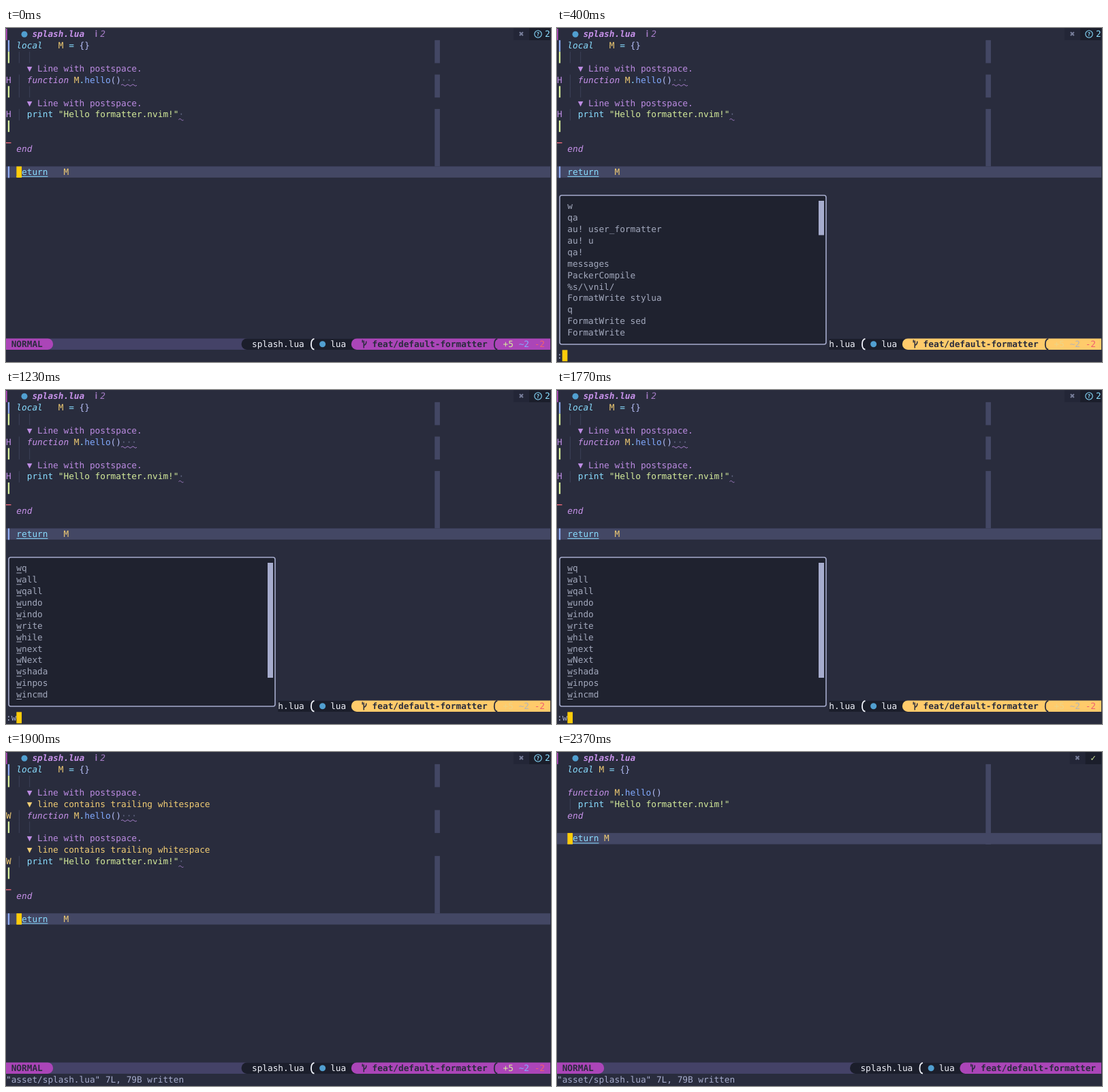
Write an HTML page with a canvas that moves like this. It is 800 px wide and 491 px high and loops after 2.5 s.

```html
<!DOCTYPE html>
<html>
<head>
<meta charset="utf-8">
<style>
html, body { margin: 0; width: 100%; height: 100%; overflow: hidden; background: #292c3d; }
canvas { display: block; }
</style>
</head>
<body>
<canvas id="stage" width="800" height="491"></canvas>
<script>
const g = document.getElementById('stage').getContext('2d');
const LOOP = 2500, W = 7.68, H = 16.87;
const AT = { command: 30, popup: 100, typed: 1070, matches: 1100, written: 1830, back: 1900, formatted: 2070, line: 2130, clean: 2170 };
const BG = '#292c3d', DARK = '#1b1e2b', LINE = '#434764', GREY = '#a6accd', CYAN = '#89ddff', BLUE = '#82aaff',
  PURPLE = '#c792ea', YELLOW = '#f2cd74', GREEN = '#d5ec9b', RED = '#ec6a78', LILAC = '#b4bdf5', CURSOR = '#ffcc0a',
  HINT = '#bd8ce3', WHITE = '#f0f2fa', ICON = '#519fd0';

const HISTORY = ['w', 'qa', 'au! user_formatter', 'au! u', 'qa!', 'messages', 'PackerCompile', '%s/\\vnil/',
  'FormatWrite stylua', 'q', 'FormatWrite sed', 'FormatWrite'];
const MATCHES = ['wq', 'wall', 'wqall', 'wundo', 'windo', 'write', 'while', 'wnext', 'wNext', 'wshada', 'winpos', 'wincmd'];

const rowY = row => 1 + row * H;

function box(x, y, w, h, color) {
  g.fillStyle = color;
  g.fillRect(x, y, w, h);
}

function pill(x, y, w, h, radii, color) {
  g.fillStyle = color;
  g.beginPath();
  g.roundRect(x, y, w, h, radii);
  g.fill();
}

function disc(x, y, r, color) {
  g.fillStyle = color;
  g.beginPath();
  g.arc(x, y, r, 0, 7);
  g.fill();
}

function outline(color, width, path) {
  g.strokeStyle = color;
  g.lineWidth = width;
  g.beginPath();
  path();
  g.stroke();
}

// Text sits on the terminal's cell grid.
function put(col, row, text, color, style = '') {
  g.font = style + ' 12.76px "DejaVu Sans Mono", monospace';
  g.fillStyle = color;
  [...text].forEach((c, i) => { if (c !== ' ') g.fillText(c, (col + i) * W, rowY(row) + 12.4); });
}

const drawCursor = (col, row) => box(col * W, rowY(row), W, H - .3, CURSOR);
const signBar = (row, color) => box(2.8, rowY(row), 2.3, H, color);
const guide = (row, ...cols) => cols.forEach(c => box((c + .45) * W, rowY(row), 1, H, '#3d4259'));
const colorColumn = (from, to) => box(82 * W - .5, rowY(from), W, (to - from + 1) * H, LINE);
const cursorLine = row => box(0, rowY(row), 799, H - .4, LINE);
const hint = row => put(4, row, '▼ Line with postspace.', HINT);

function trailing(col, row, n) {
  put(col, row, '·'.repeat(n), '#636985');
  outline('#a77fcb', 1, () => {
    for (let x = 0; x <= n * W; x++) g.lineTo(col * W + x, rowY(row) + 15.6 - 1.1 * Math.sin(x * Math.PI * 2 / W));
  });
}

function localLine(row, gap) {
  put(2, row, 'local', CYAN, 'italic');
  put(7 + gap, row, 'M', YELLOW);
  put(9 + gap, row, '=', CYAN);
  put(11 + gap, row, '{}', LILAC);
}

function functionLine(col, row) {
  put(col, row, 'function', PURPLE, 'italic');
  put(col + 9, row, 'M', YELLOW);
  put(col + 10, row, '.', CYAN);
  put(col + 11, row, 'hello', BLUE);
  put(col + 16, row, '()', LILAC);
}

function printLine(row) {
  guide(row, 2);
  put(4, row, 'print', CYAN);
  put(10, row, '"Hello formatter.nvim!"', GREEN);
}

function returnLine(row, gap) {
  put(2, row, 'return', CYAN);
  box(2 * W, rowY(row) + 14.4, 6 * W, 1, CYAN);
  put(8 + gap, row, 'M', YELLOW);
}

const endLine = row => put(2, row, 'end', PURPLE, 'italic');

function tabLine(clean) {
  box(0, 1, 1.6, H, '#b348bd');
  disc(27, 9.3, 4.5, ICON);
  put(5, 0, 'splash.lua', PURPLE, 'italic bold');
  const x = (clean ? 101 : 100) * W;
  box(x - 3 * W, 0, 3 * W, 18, '#232637');
  box(x, 0, 799 - x, 18, DARK);
  put(x / W - 2, 0, '✖', '#777d99');
  if (clean) {
    put(102, 0, '✓', GREEN);
    return;
  }
  put(17, 0, 'ℹ', '#a47bc5', 'bold');
  put(18, 0, '2', '#a47bc5', 'italic');
  outline(CYAN, 1.1, () => g.arc(781, 9, 5.2, 0, 7));
  g.font = 'bold 8px "DejaVu Sans Mono", monospace';
  g.fillStyle = CYAN;
  g.fillText('?', 778.6, 12);
  put(103, 0, '2', CYAN);
}

// Buffer before formatting; lint adds a warning line above each flagged one.
function messyBuffer(lint) {
  const f = lint ? 5 : 4, p = lint ? 9 : 7, last = p + 5;
  colorColumn(1, 2);
  colorColumn(f, f + 1);
  colorColumn(p, last - 1);
  cursorLine(last);
  [1, last].forEach(row => signBar(row, '#8fabf0'));
  [2, f + 1, p + 1].forEach(row => signBar(row, GREEN));
  box(0, rowY(p + 2) + 15.2, 7.5, 1.4, RED);
  [f, p].forEach(row => {
    put(0, row, lint ? 'W' : 'H', lint ? YELLOW : HINT);
    hint(row - (lint ? 2 : 1));
    if (lint) put(4, row - 1, '▼ line contains trailing whitespace', YELLOW);
  });
  localLine(1, 3);
  guide(2, 2, 4);
  guide(f, 2);
  functionLine(4, f);
  trailing(22, f, 3);
  guide(f + 1, 2, 4);
  printLine(p);
  trailing(33, p, 1);
  endLine(p + 3);
  returnLine(last, 3);
  return last;
}

function tidyBuffer(t) {
  colorColumn(1, 7);
  if (t >= AT.line) cursorLine(7);
  localLine(1, 1);
  functionLine(2, 3);
  printLine(4);
  endLine(5);
  returnLine(7, 1);
  if (t < AT.clean) {
    [3, 5].forEach(row => put(0, row, 'H', HINT));
    [8, 9].forEach(hint);
  }
  return 7;
}

function separator(col, color) {
  const x = col * W + 7, y = rowY(27);
  outline(color, 1.8, () => {
    g.moveTo(x, y + .5);
    g.bezierCurveTo(x - 6, y + 2, x - 6, y + H - 2, x, y + H - .8);
  });
}

function branchIcon(x, y) {
  outline(BG, 1.5, () => {
    g.moveTo(x, y + 2);
    g.lineTo(x, y + 6);
    g.moveTo(x + 2, y + 14);
    g.lineTo(x + 2, y + 3);
    g.moveTo(x + 2, y + 10);
    g.quadraticCurveTo(x + 6, y + 8.5, x + 5.5, y + 4);
  });
}

function statusLine(command, formatted) {
  const y = rowY(27), h = H - .4, shift = formatted ? 11 : 0;
  const mode = command ? 'COMMAND' : 'NORMAL', main = command ? '#ffcb6b' : '#ab45b8';
  const file = (45 + shift) * W, branch = (66 + shift) * W;
  box(0, y, 799, h, '#444267');
  pill(0, y, (mode.length + 3) * W, h, [0, 8, 8, 0], main);
  put(1, 27, mode, BG, 'bold');
  pill(file, y, 799 - file, h, [8, 0, 0, 8], DARK);
  put(47 + shift, 27, 'splash.lua', WHITE);
  separator(58 + shift, WHITE);
  disc((60.5 + shift) * W, y + 8.3, 4.5, ICON);
  put(62 + shift, 27, 'lua', WHITE);
  pill(branch, y, 799 - branch, h, [8, 0, 0, 8], main);
  branchIcon(branch + 2 * W + 1, y);
  put(70 + shift, 27, 'feat/default-formatter', BG, 'bold');
  if (formatted) return;
  separator(93, BG);
  put(95, 27, '+5', command ? '#eed486' : GREEN);
  put(98, 27, '~2', command ? '#b3b4b8' : '#86aaff');
  put(101, 27, '-2', '#f0606f');
}

function popupMenu(items, matched) {
  box(0, rowY(14), 52 * W, 14 * H, BG);
  pill(4, 246, 391, 219, 3, '#1f222f');
  outline(GREY, 1.6, () => g.roundRect(4, 246, 391, 219, 3));
  box(384, 254, 8, matched ? 169 : 50.5, GREY);
  items.forEach((item, i) => {
    put(2, 15 + i, item, '#a3a9bd');
    if (matched) box(2 * W, rowY(15 + i) + 14.4, W, 1, '#a3a9bd');
  });
}

function draw(t) {
  const command = t >= AT.command && t < AT.written;
  const written = t >= AT.written, formatted = t >= AT.formatted, matched = t >= AT.matches;
  box(0, 0, 800, 491, BG);
  tabLine(t >= AT.clean);
  const row = formatted ? tidyBuffer(t) : messyBuffer(written);
  statusLine(command, formatted);
  if (command) {
    const typed = t >= AT.typed ? ':w' : ':';
    if (t >= AT.popup) popupMenu(matched ? MATCHES : HISTORY, matched);
    put(0, 28, typed, GREY);
    drawCursor(typed.length, 28);
    return;
  }
  if (written) put(0, 28, '"asset/splash.lua" 7L, 79B written', GREY);
  if (written && t < AT.back) drawCursor(34, 28);
  else drawCursor(2, row);
}

g.textRendering = 'geometricPrecision';
const began = performance.now();
function tick() {
  draw((performance.now() - began) % LOOP);
  requestAnimationFrame(tick);
}
tick();
</script>
</body>
</html>
```
